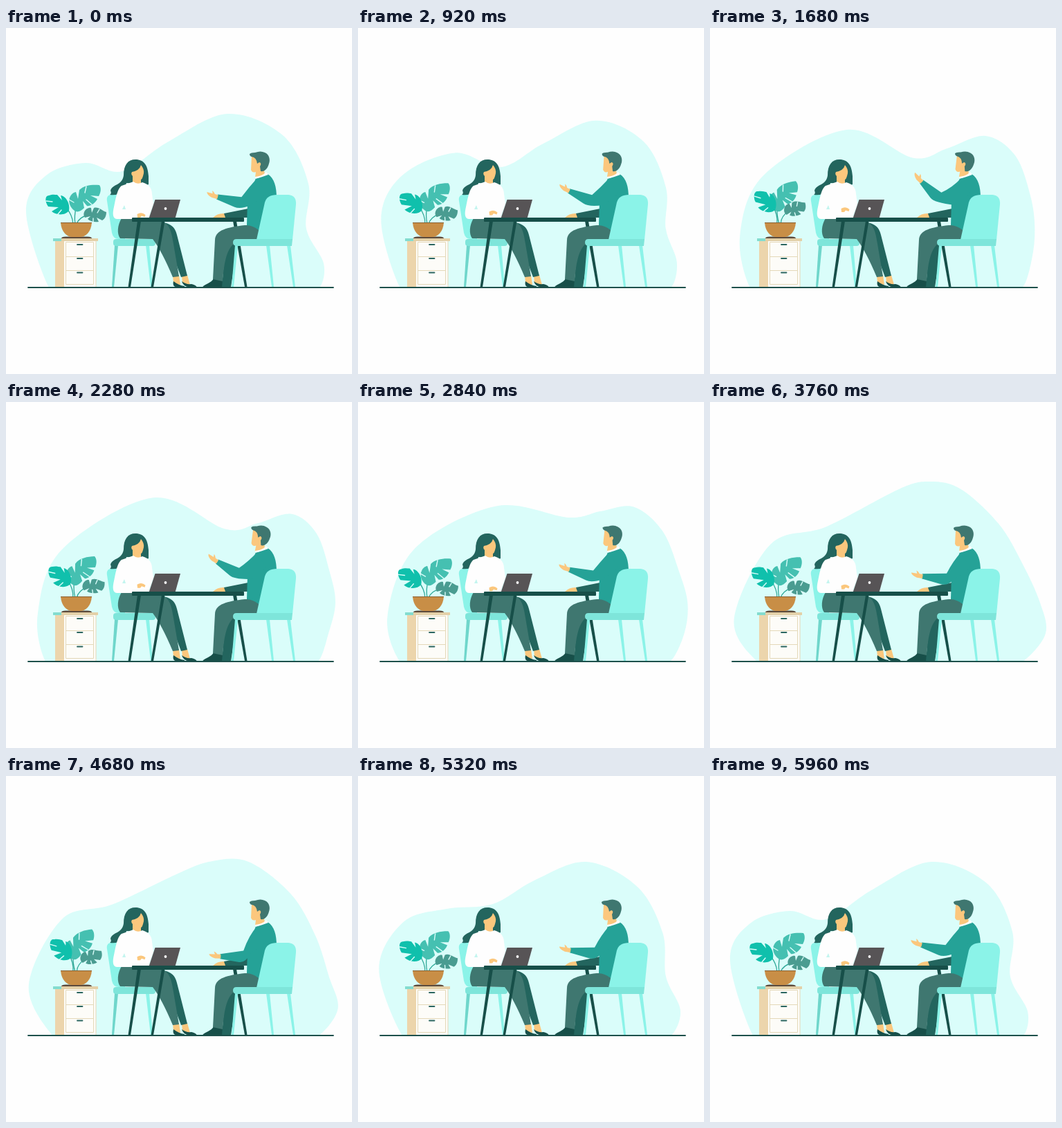
An HTML page for the animation above (6120 ms loop, 500x500 px).

```html
<!DOCTYPE html>
<html lang="en">
<head>
<meta charset="utf-8">
<title>Meeting at a desk</title>
<style>
  html, body { margin: 0; width: 100%; height: 100%; overflow: hidden; background: #fefefe; }
  svg { display: block; width: 100vw; height: 100vh; }
  .skin { fill: #fbc77d; }
  .dark { fill: #174f49; }
  .deep { fill: #23655e; }
  .pants { fill: #3f7770; }
  .sweater { fill: #25a297; }
  .mint { fill: #8bf3e8; }
  .seat { fill: #7ee5da; }
  .white { fill: #fefefe; }
  .stem { fill: none; stroke: #2fa898; stroke-width: 1.3; stroke-linecap: round; }
  .cut { fill: none; stroke: #dafdfa; stroke-width: 1.4; stroke-linecap: round; }
</style>
</head>
<body>
<svg viewBox="0 0 500 500">
  <path id="blob" fill="#dafdfa"/>

  <g id="cabinet">
    <path fill="#ecd5ac" d="M71 307H85V374H71Z"/>
    <path fill="#fdfcf8" d="M84 307H130V374H84Z"/>
    <path fill="none" stroke="#e4d8b8" d="M86.5 309.5H126.5V370.5H86.5ZM86.5 330.5H126.5M86.5 350.5H126.5M130 308V374"/>
    <path fill="#e3d0a8" d="M68 304H133V308H68Z"/>
    <path fill="#83dccf" d="M68 304H80V308H68Z"/>
    <path fill="none" stroke="#2b6660" stroke-width="1.8" stroke-linecap="round" d="M103 313H110.500M103 333H110.500M103 353.500H110.500"/>
  </g>

  <g id="leafBig">
    <path class="stem" d="M100 283Q98 272 102 256"/>
    <path fill="#45c0b1" d="M99 264C92 259 89 250 93 243C95 239 99 237 101 237L104 247L106 234C113 227 125 226 135 227C138 231 137 238 134 243L122 242L132 247C128 255 120 258 117 257L111 250L113 260C108 265 103 267 99 264Z"/>
    <path class="cut" d="M116 229L114 238M91 248L98 252M124 255L116 248"/>
  </g>
  <g id="leafSmall">
    <path class="stem" d="M102 283Q106 273 119 270"/>
    <path fill="#4a9c91" d="M113 266C115 261 120 259 123 260L124 267L127 260C134 258 138 264 145 266C145 271 143 276 139 278L131 274L134 280C127 281 121 279 118 276L122 272L114 274C112 271 112 268 113 266Z"/>
    <path class="cut" d="M135 262L132 267M126 280L126 275"/>
  </g>
  <g id="leafLeft">
    <path class="stem" d="M97 283Q96 270 87 260"/>
    <path fill="#10c0ac" d="M91 264C86 271 73 271 66 265L76 259L61 258C56 251 56 242 62 242C67 240 71 241 74 241L81 249L79 242C87 243 93 254 91 264Z"/>
    <path class="cut" d="M58 250L67 251M75 269L80 263"/>
  </g>
  <path fill="#5d4b3c" d="M80 304Q80 301.500 86 301.500H118Q124 301.500 124 304Z"/>
  <path fill="#c88e46" d="M79 281H124C123 295 115 302 107 302H96C88 302 80 295 79 281Z"/>
  <path stroke="#8a5f2e" d="M79 281.500H124"/>

  <g id="womanChair">
    <path fill="#6fd6cb" d="M157 314H162L156 374H153Z"/>
    <path class="mint" d="M202 314H207L212 374H209ZM152 241C147 241 145 245 146 250L153 296Q155 305 163 305H172V241Z"/>
    <rect class="seat" x="155" y="305" width="61" height="10" rx="4"/>
  </g>

  <g id="woman">
    <path class="skin" d="M241 357H250L252 371L242 369ZM254 357H262L266 371L255 369Z"/>
    <path class="dark" d="M242 366Q250 372 258 373V374.500H246Q240 373 242 366ZM254 366Q260 371 268 370Q274 371 276 374.500H264Q256 373 254 366Z"/>
    <path class="deep" d="M215 279C235 281 244 285 247 299L262 358L253 360L238 320Z"/>
    <path class="pants" d="M167 275C161 285 160 297 165 304L212 305Q225 322 241 360L250 359L242 312C239 291 235 281 222 279L205 275Z"/>
    <path class="deep" d="M170 213C170 198 176 190 187 190C200 190 205 199 206 214V226Q200 229 194 225L174 224C172 236 164 243 150 241Q153 239 151 235C154 225 168 228 170 213Z"/>
    <path class="skin" d="M182 208Q193 206 195 198Q200 204 199 210Q197 219 195 219V225Q189 229 183 224V214Q180 211 182 208Z"/>
    <path class="white" d="M167 228Q178 224 184 222Q190 227 197 223C207 226 211 232 211 240L213 254L207 270V276H162C155 277 154 270 155 264C158 250 160 233 167 228Z"/>
    <path fill="#c3f5ef" d="M168 262L171 256L173 262Z"/>
    <path id="typing" class="skin" d="M189.500 269Q196 265 201.500 270L200.500 273L196 271.500L194 274H190Z"/>
  </g>

  <path id="laptop" fill="#575456" d="M215.500 248H252L244.500 275H206.500Z"/>
  <circle class="white" cx="230.500" cy="261" r="1.900"/>

  <path class="dark" d="M328 279H333L348.500 374H345Z"/>

  <g id="man">
    <path class="dark" d="M300 362L313 364V374.500H284C286 370 297 369 300 362Z"/>
    <path class="deep" d="M316 325L330 306L334 316L325 374.500H312Z"/>
    <path class="pants" d="M366 285H345C319 288 303 292 302 306L299 363L313 366C315 342 318 322 328 313L366 306Z"/>
    <path class="skin" d="M299 274Q306 267 316 268L318 274Z"/>
    <path class="deep" d="M315 268L350 261V274H317Z"/>
    <g id="head">
      <path class="skin" d="M355 185L354 205Q356 210 361 208L360 216L374 212L370 185Z"/>
      <path class="pants" d="M352 182Q354 180 360 180Q368 177 374 180C381 183 382 191 380 196C378 204 373 208 368 207L367 200Q370 195 366 194L363 196Q362 187 355 186Q352 185 352 182Z"/>
    </g>
    <path class="sweater" d="M361 217L378 211C388 217 391 230 391 245L384 293L365 292Q358 286 348 285L349 250Z"/>
    <path class="white" d="M360 215Q371 214 376 208L379 212Q371 215 361 218Z"/>
    <path id="arm" class="sweater"/>
    <path id="hand" class="skin" d="M1 -3H-4Q-6 -6 -9 -7L-7.500 -3L-16 -3Q-15 1 -7 3H1Z"/>
  </g>

  <g id="manChair">
    <path class="mint" d="M331 314H335L329 374H326ZM376 314H381L387 374H384ZM406 314H411L418 374H415Z"/>
    <path class="mint" d="M374 252Q377 241 392 241H408Q420 242 419 255L414 306H362Z"/>
    <path class="seat" d="M333 305H414L413 315H334Q328 315 328 310Q328 305 333 305Z"/>
  </g>

  <g id="table" class="dark">
    <path d="M190 279H195L180 374.500H176.500ZM225 279H229.500L213 374.500H209.500Z"/>
    <rect x="182" y="274" width="162" height="6" rx="1"/>
  </g>
  <path stroke="#1d504b" stroke-width="1.800" stroke-linecap="round" d="M32 375H473"/>
</svg>
<script>
const LOOP = 6120, STEP = 40, BEGIN = 280, SPAN = 5680;
const FLOOR = 375;
const $ = id => document.getElementById(id);
const clamp = (v, lo, hi) => Math.max(lo, Math.min(hi, v));
const mix = (a, b, k) => a + (b - a) * k;
// Rises from 0 to 1 and falls back once per unit.
const pulse = u => Math.sin(Math.PI * u) ** 2;
const rotate = (id, deg, x, y) => $(id).setAttribute('transform', `rotate(${deg} ${x} ${y})`);

// Three outlines, from bottom left over the top to bottom right.
const outlines = [
  'M62 375 29 266 58 213 115 195 168 207 235 164 320 124 400 155 437 225 434 290 459 340 453 375',
  'M57 375 46 306 81 213 213 138 317 184 363 176 413 162 449 190 468 246 476 290 466 334 451 375',
  'M69 375 34 314 88 205 165 183 270 122 315 111 360 124 415 175 450 232 477 290 486 335 452 375',
].map(s => s.match(/\d+/g).map(Number));

// Smooth curve through the points, rounded towards the floor at both ends.
function spline(p) {
  const pts = [];
  for (let i = 0; i < p.length; i += 2) pts.push([p[i], p[i + 1]]);
  const n = pts.length;
  const all = [[pts[0][0] + 25, FLOOR], ...pts, [pts[n - 1][0] - 25, FLOOR]];
  let d = `M${pts[0]}`;
  for (let i = 1; i < n; i++) {
    const [a, b, c, e] = all.slice(i - 1, i + 3);
    const c1 = b.map((v, k) => v + (c[k] - a[k]) / 6);
    const c2 = c.map((v, k) => v - (e[k] - b[k]) / 6);
    d += `C${c1} ${c2} ${c}`;
  }
  return d + 'Z';
}

function drawBlob(u) {
  const part = u * 3, i = Math.floor(part) % 3;
  const k = pulse((part % 1) / 2);
  const next = outlines[(i + 1) % 3];
  $('blob').setAttribute('d', spline(outlines[i].map((v, j) => mix(v, next[j], k))));
}

// w runs from 1 (raised) to -1 (lowered).
function drawArm(w) {
  const bend = 2.5 * w * w;
  const ex = 338 - 7.5 * w - bend, ey = 253 - 8.75 * w;
  const cx = 305 - 2 * w + bend, cy = 244 - 19.5 * w - bend;
  const len = Math.hypot(cx - ex, cy - ey);
  const dx = (cx - ex) / len, dy = (cy - ey) / len;
  // Point along the forearm from the elbow, k to its upper side.
  const at = (along, k) => `${ex + dx * along - dy * k} ${ey + dy * along + dx * k}`;
  $('arm').setAttribute('d', `M363 217Q351 230 ${at(0, 9)}L${at(len, 3.5)}L${at(len, -3.5)}`
    + `L${at(6, -7.5)}Q${at(-3, -9)} 354 256L376 240Z`);
  const deg = Math.atan2(-dy, -dx) * 180 / Math.PI;
  $('hand').setAttribute('transform', `translate(${cx} ${cy}) rotate(${deg})`);
}

function draw(t) {
  const u = clamp((t - BEGIN) / SPAN, 0, 1);
  const sway = pulse(2 * u);
  drawBlob(u);
  rotate('leafLeft', 10 * sway, 100, 282);
  rotate('leafBig', -11 * sway, 100, 282);
  rotate('leafSmall', -19 * sway ** 2, 100, 282);
  rotate('head', 4.5 * pulse(clamp(u / 0.64, 0, 1)), 367, 212);
  $('typing').setAttribute('transform', `translate(0 ${-8 * sway})`);
  drawArm(u < 0.5 ? sway : -sway);
}

const start = performance.now();
function tick() {
  const t = (performance.now() - start) % LOOP;
  draw(Math.floor(t / STEP) * STEP);
  requestAnimationFrame(tick);
}
tick();
</script>
</body>
</html>
```
